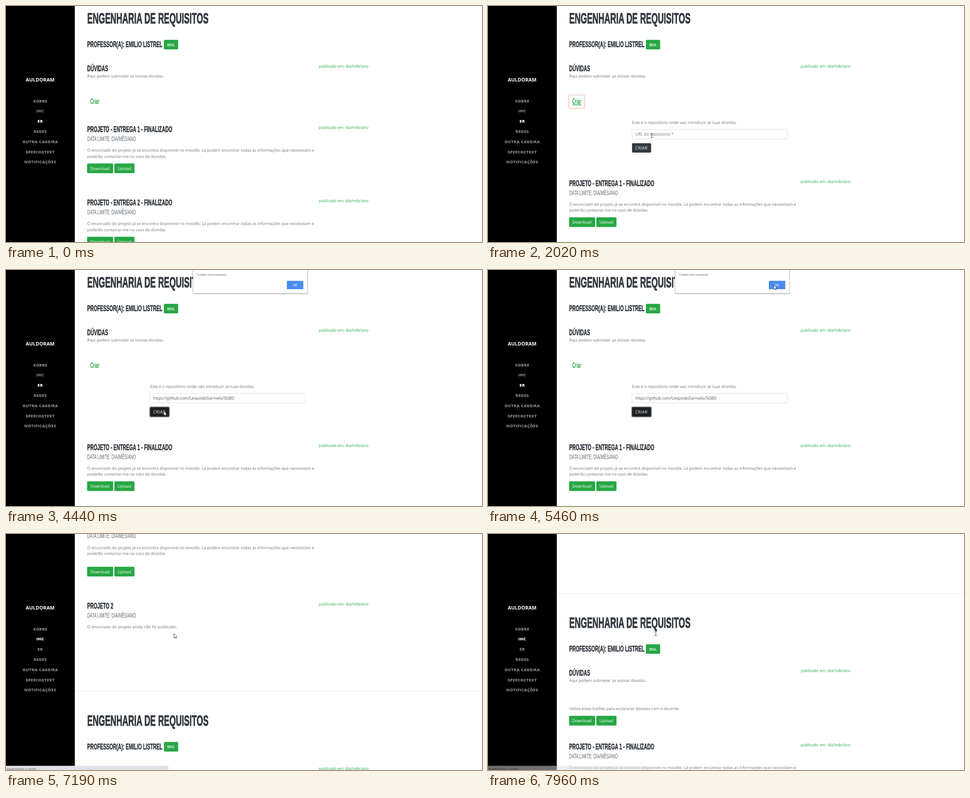
These frames come from a looping animation (1061 by 528 pixels, 8 s). An HTML page:

```html
<!DOCTYPE html>
<html lang="pt">
<head>
<meta charset="utf-8">
<title>Portal de cadeiras</title>
<style>
html, body { margin: 0; width: 100%; height: 100%; overflow: hidden; background: #fff; }
svg { display: block; width: 100%; height: 100%; }
text { font: 8.92px "Open Sans", "Noto Sans", sans-serif; fill: #6c757d; white-space: pre; }
.head { font-family: "Liberation Sans", Arial, sans-serif; }
.strong { font-weight: 700; fill: #343a40; stroke: #343a40; stroke-width: .7px; stroke-linejoin: round; }
.big { stroke-width: 1.1px; }
.sub { fill: #5f686f; }
.link { font-weight: 700; fill: #28a745; }
.mail { font-weight: 700; fill: #fff; letter-spacing: .6px; }
.date { font-size: 8.7px; fill: #28a745; text-anchor: end; }
.light { font-size: 9px; fill: #fff; }
.nav { font-size: 9.1px; font-weight: 800; letter-spacing: .35px; text-anchor: middle; }
.brand { font-size: 11px; font-weight: 700; fill: #fff; text-anchor: middle; }
.value { fill: #495057; }
.tiny { font-size: 6.8px; fill: #5a5d61; }
</style>
</head>
<body>
<svg id="stage" viewBox="0 0 1061 528" preserveAspectRatio="none" xmlns="http://www.w3.org/2000/svg"></svg>
<script>
const LOOP = 8000;
const CONDENSE = 0.543;      // one setting for the narrow heading face
const ER_TOP = 569;
const LEFT = 181;

const label = (x, y, str, cls = '') => `<text x="${x}" y="${y}" class="${cls}">${str}</text>`;
const heading = (x, y, size, str, cls = 'strong', id = '') =>
  `<text id="${id}" class="head ${cls}" style="font-size:${size}px" transform="translate(${x} ${y}) scale(${CONDENSE} 1)">${str}</text>`;
const box = (x, y, w, h, fill, extra = '') =>
  `<rect x="${x}" y="${y}" width="${w}" height="${h}" fill="${fill}" ${extra}/>`;
const button = (x, y, w, str) =>
  box(x, y, w, 21.7, '#28a745', 'rx="2.2"') + label(x + 7.2, y + 14.3, str, 'light');
const fileButtons = y => button(180.7, y, 58.2, 'Download') + button(241.4, y, 45, 'Upload');
const date = y => label(808, y, 'publicado em: dia/mês/ano', 'date');
const title = (y, str) => heading(LEFT, y, 33.7, str, 'strong big');
const teacher = (y, name, x) =>
  heading(LEFT, y, 19.1, `PROFESSOR(A): ${name}`) +
  box(x, y - 16.3, 31.7, 21.4, '#28a745', 'rx="2.2"') + heading(x + 7.5, y - 2.5, 9, 'EMAIL', 'mail');
const project = (y, name) =>
  heading(LEFT, y, 19.1, name) + heading(LEFT, y + 20, 15.3, 'DATA LIMITE: DIA/MÊS/ANO', 'sub');
const brief = (y, end) =>
  label(LEFT, y, 'O enunciado do projeto já se encontra disponível no moodle. Lá podem encontrar todas as informações que necessitam e') +
  label(LEFT, y + 13.7, `poderão contactar-me no caso de dúvidas${end}`);
const delivery = (y, n, end) =>
  project(y, `PROJETO - ENTREGA ${n} - FINALIZADO`) + date(y - 7) + brief(y + 44, end) + fileButtons(y + 70.2);

const ihc = title(76, 'INTERAÇÃO HUMANO COMPUTADOR') +
  teacher(128, 'LORENA WEXBY', 353) +
  project(168.7, 'PROJETO 1') + date(148.2) + brief(213, '') + fileButtons(252.7) +
  project(346.3, 'PROJETO 2') + date(339.2) +
  label(LEFT, 390.3, 'O enunciado do projeto ainda não foi publicado.');

const form = label(321, 263.5, 'Este é o repositório onde vais introduzir as tuas dúvidas.') +
  box(321, 276.4, 346.5, 21, '#fff', 'id="field" rx="2" stroke="#ced4da" stroke-width=".8"') +
  box(320.7, 276, 347.2, 21.8, 'none', 'id="fieldRing" rx="2.6" stroke="#ebc3b5" stroke-width="2"') +
  '<text id="entry" x="328.5" y="290.2"></text>' +
  '<path id="caret" stroke="#333" stroke-width=".8"/>' +
  box(320.3, 306.3, 44, 22.4, 'none', 'id="sendRing" rx="3" stroke="#999c9f" stroke-width="2"') +
  box(321, 307, 42.6, 21, '#343a40', 'id="send" rx="2.2"') +
  '<text x="328.3" y="321" class="light" style="letter-spacing:.5px">CRIAR</text>';

const er = title(39.3, 'ENGENHARIA DE REQUISITOS') +
  teacher(92, 'EMILIO LISTREL', 352) +
  heading(LEFT, 146, 19.1, 'DÚVIDAS') + date(138.2) +
  label(LEFT, 160, 'Aqui podem submeter as vossas dúvidas.') +
  '<g id="create">' +
  box(180, 199, 35.6, 30, 'none', 'id="linkRing" rx="3" stroke="#efd0c5" stroke-width="2"') +
  heading(188, 219, 15.6, 'Criar', 'link', 'link') + '</g>' +
  `<g id="form" clip-path="url(#fold)">${form}</g>` +
  `<g id="done">${label(LEFT, 223.3, 'Utiliza estes botões para esclarecer dúvidas com o docente.')}${fileButtons(235.8)}</g>` +
  `<g id="lower">${delivery(282, 1, '.')}${delivery(446, 2, '')}</g>`;

const menu = ['SOBRE', 'IHC', 'ER', 'REDES', 'OUTRA CADEIRA', 'SPEECH2TEXT', 'NOTIFICAÇÕES'];
const sidebar = box(0, 0, 153.4, 528, '#000') + label(76, 169, 'AULDORAM', 'brand') +
  menu.map((item, i) => `<text class="nav" x="76.3" y="${215.6 + i * 22.78}">${item}</text>`).join('');

const dialog = box(417, -10, 255, 62, '#fff', 'rx="1.5" stroke="#aaa" stroke-width=".6" filter="url(#shadow)"') +
  label(426, 12.6, 'Criado com sucesso!', 'tiny') +
  box(626, 24.2, 36.7, 18.8, '#4a8df0', 'rx="1.6"') +
  '<text x="644.3" y="36" class="light" text-anchor="middle" style="font-size:6.4px;font-weight:600">OK</text>';

const cursors =
  '<path id="arrow" d="M0 0V10L2.3 8L3.8 11.2L5.4 10.5L4 7.3H7Z" fill="#fff" stroke="#222" stroke-width=".8"/>' +
  '<path id="hand" d="M-1 1Q0-.8 1 1V4.5Q2-.1 3 5Q4.2 4 4.6 5.6Q6 5 6 7V9L4.8 12H-.2L-3.6 7.4Q-3.6 5.6-1 7Z" fill="#fff" stroke="#222" stroke-width=".8"/>' +
  '<path id="beam" d="M-2.3-4.5H-.6L0-4L.6-4.5H2.3M0-4V4M-2.3 4.5H-.6L0 4L.6 4.5H2.3" fill="none" stroke="#222" stroke-width=".9"/>';

const stage = document.getElementById('stage');
stage.innerHTML = `<defs>
  <clipPath id="fold"><rect id="foldBox" x="154" y="236" width="907" height="0"/></clipPath>
  <filter id="shadow" x="-10%" y="-20%" width="120%" height="150%">
    <feDropShadow dx="0" dy="1" stdDeviation="1.2" flood-opacity=".4"/>
  </filter></defs>
  ${box(0, 0, 1061, 528, '#fff')}
  <g id="page">${ihc}${box(153, 531, 908, .8, '#dfe1e3')}<g transform="translate(0 ${ER_TOP})">${er}</g></g>
  ${sidebar}
  <g id="status">${box(0, 518.6, 362, 10, '#dee1e6')}${label(1.5, 527.8, 'Aguardando o cache...', 'tiny')}</g>
  <g id="dialog">${dialog}</g>${cursors}`;

const el = id => document.getElementById(id);
const navItems = [...stage.querySelectorAll('.nav')];
const set = (id, name, value) => el(id).setAttribute(name, value);
const show = (id, amount) => set(id, 'opacity', Number(amount));
const between = (t, a, b) => t >= a && t < b;
const ramp = (t, a, b) => Math.min(1, Math.max(0, (t - a) / (b - a)));
const smooth = p => p * p * (3 - 2 * p);

// Linear interpolation through [time, ...values] stops.
function follow(stops, t) {
  let i = 0;
  while (i < stops.length - 2 && t >= stops[i + 1][0]) i++;
  const [a, b] = [stops[i], stops[i + 1]];
  const p = ramp(t, a[0], b[0]);
  return a.slice(1).map((v, k) => v + (b[k + 1] - v) * p);
}

const pointerPath = [
  [290, 895, 468], [650, 560, 290], [900, 228, 184], [1080, 201, 212], [1560, 201, 212],
  [1930, 364, 288], [2020, 365, 290], [2560, 365, 290], [2630, 365.5, 293], [2780, 365, 294],
  [3190, 351, 316], [4440, 351, 316], [4900, 697, 90], [5230, 636, 28], [5290, 636, 30],
  [5460, 637, 33.5], [5610, 637, 33.5], [6410, 381, 142], [6500, 389, 139], [6700, 389, 139],
  [7000, 374.5, 222.5], [7960, 374, 223]
];
const scrollPath = [
  [6080, 0], [6900, 0], [7050, 113], [7290, 226], [7480, 226], [7580, 250], [7960, 398], [8000, 398]
];

function pointerKind(t) {
  if (t < 290) return '';
  if (between(t, 1040, 1640) || between(t, 3100, 4060)) return 'hand';
  if (between(t, 1880, 3100) || t >= 7680) return 'beam';
  return 'arrow';
}

function draw(t) {
  const reloaded = t >= 6080;
  const scroll = reloaded ? follow(scrollPath, t)[0] : ER_TOP;
  set('page', 'transform', `translate(0 ${-scroll})`);

  const open = 120.6 * smooth(ramp(t, 1240, 1590));
  set('foldBox', 'height', reloaded ? 0 : open);
  set('lower', 'transform', `translate(0 ${reloaded ? 29 : open})`);
  show('create', !reloaded);
  show('done', reloaded);

  show('linkRing', ramp(t, 1160, 1240) - ramp(t, 2160, 2310));
  set('link', 'text-decoration', between(t, 1040, 2200) ? 'underline' : 'none');

  const filled = t >= 2490;
  const focused = between(t, 2160, 3800);
  show('fieldRing', ramp(t, 2160, 2310) - ramp(t, 3640, 3790));
  el('entry').textContent = filled ? 'https://github.com/LeopoldoSarmelo/SGBD' : 'URL do repositório *';
  set('entry', 'class', filled ? 'value' : '');
  const caretX = filled ? 329 + el('entry').getComputedTextLength() : 328.5;
  set('caret', 'd', `M${caretX} 281.5V292.5`);
  const blink = filled ? (t - 2490) % 1000 < 500 || t > 3190 : t < 2490;
  show('caret', focused && t < 3640 && blink);

  const pressed = t >= 3640;
  set('send', 'fill', pressed ? '#1d2124' : t >= 3100 ? '#23272b' : '#343a40');
  show('sendRing', ramp(t, 3640, 3790));
  show('dialog', between(t, 4040, 5640));

  show('status', t < 5900 ? 0 : 1 - 0.5 * ramp(t, 7860, 7960));
  const active = reloaded ? 1 : 2;
  navItems.forEach((item, i) => { item.style.fill = i === active ? '#fff' : '#858585'; });

  const kind = pointerKind(t);
  const [x, y] = follow(pointerPath, t);
  for (const id of ['arrow', 'hand', 'beam']) {
    show(id, id === kind);
    set(id, 'transform', `translate(${x} ${y})`);
  }
}

const start = performance.now();
function tick() {
  draw((performance.now() - start) % LOOP);
  requestAnimationFrame(tick);
}
tick();
</script>
</body>
</html>
```
